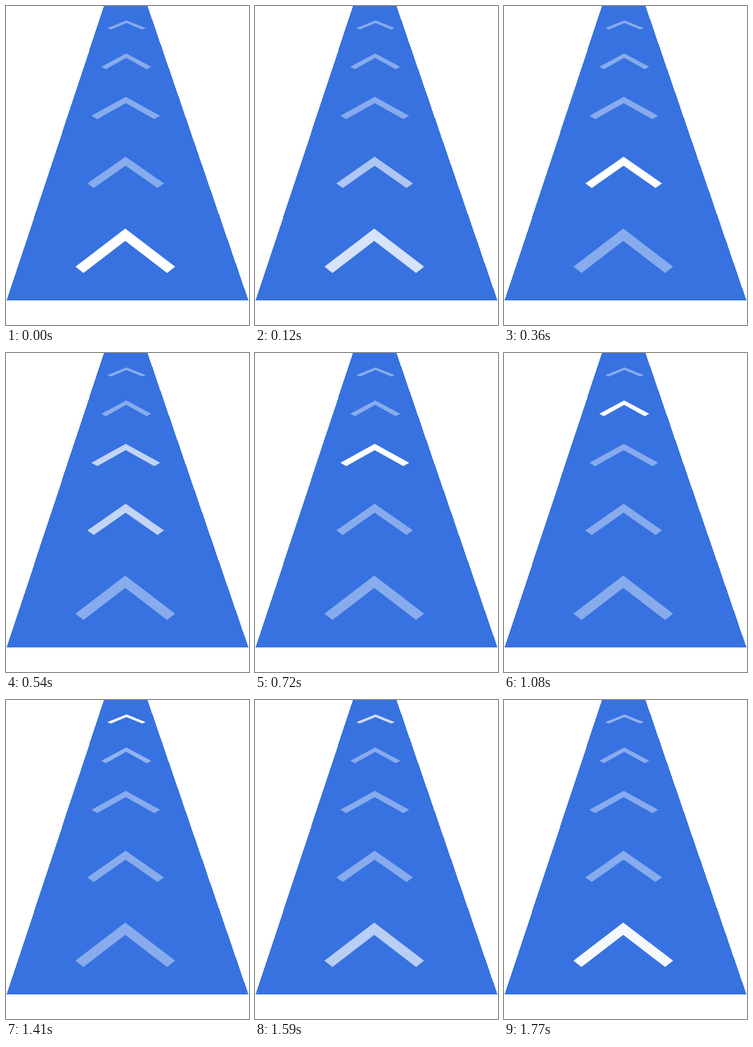
An HTML page that plays this animation: 346 by 454 pixels, repeating every 1860 ms.

```html
<!DOCTYPE html>
<html lang="en">
<head>
<meta charset="utf-8">
<title>Forward arrows</title>
<style>
  html, body { margin: 0; width: 100%; height: 100%; overflow: hidden; background: #fff; }
  svg { display: block; width: 346px; height: 454px; }
</style>
</head>
<body>
<svg viewBox="0 0 346 454">
  <polygon points="139.5,0 201.5,0 345.2,419 1,419" fill="#3772e0" shape-rendering="crispEdges"/>
  <g id="arrows" fill="#fff">
    <polygon points="169.8,316.8 240.8,371 229.4,379.9 169.8,334.2 110.3,379.9 98.9,371"/>
    <polygon points="170.3,214.6 225,252.6 215.7,259 170.3,227.3 125,259 115.8,252.6"/>
    <polygon points="170.5,129.2 219.5,156.2 211.2,160.9 170.5,138.2 129.9,160.9 121.6,156.2"/>
    <polygon points="171.2,67.5 206.8,86.6 200.3,90.1 171.2,73.8 142.1,90.1 135.7,86.6"/>
    <polygon points="171.6,20.6 199,31.5 194,33.5 171.6,24.2 149.3,33.5 144.2,31.5"/>
  </g>
</svg>
<script>
const LOOP = 1860, STEP = 60, STAGE = 360, DIM = 0.4;
const arrows = [...document.querySelectorAll('#arrows polygon')];

// Time is held in 60 ms steps, with three longer holds.
function heldTime(t) {
  if (t < 1170) return Math.min(Math.floor(t / STEP) * STEP, 1080);
  const held = 1170 + Math.floor((t - 1170) / STEP) * STEP;
  return held === 1470 ? 1410 : Math.min(held, 1770);
}

function render(t) {
  const phase = heldTime(t) / STAGE;
  arrows.forEach((arrow, i) => {
    const gap = Math.abs(phase - i);
    const distance = Math.min(gap, arrows.length - gap);
    const glow = Math.max(0, 1 - distance);
    arrow.setAttribute('fill-opacity', DIM + (1 - DIM) * glow);
  });
}

const start = performance.now();
function tick() {
  render((performance.now() - start) % LOOP);
  requestAnimationFrame(tick);
}
tick();
</script>
</body>
</html>
```
